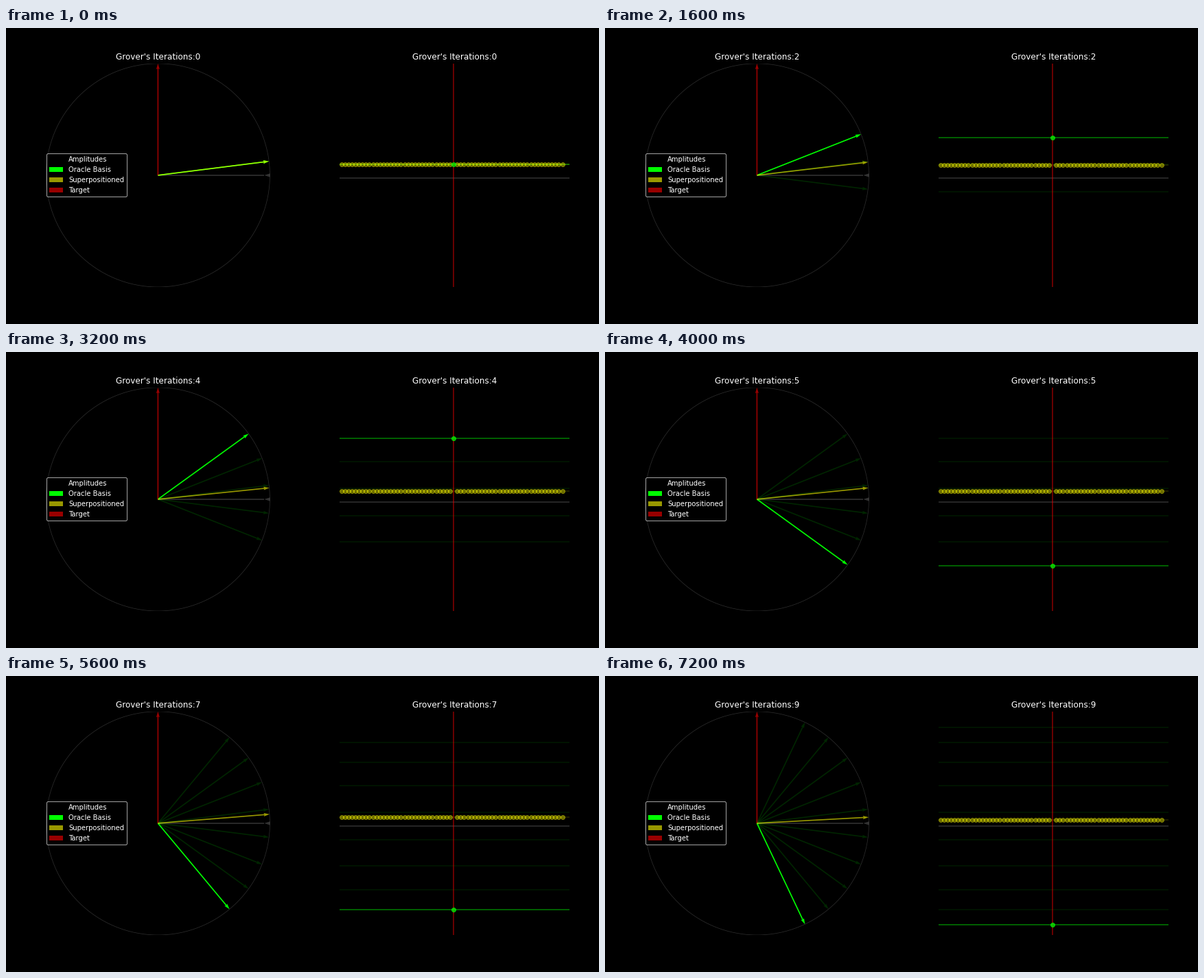
Recreate the animation shown at these times as a matplotlib script. Size 864x432 px, loop 8 s.

```python
import numpy as np
import matplotlib.pyplot as plt
from matplotlib.animation import FuncAnimation
from matplotlib.patches import Circle, Patch

W, H, DPI = 864, 432, 72
STATES, TARGET, STEPS = 64, 32, 10
THETA = np.arcsin(1 / np.sqrt(STATES))
LIME, YELLOW, RED = "#00ff00", "#ffff00", "#ff0000"

plt.rcParams["font.family"] = "DejaVu Sans"
fig = plt.figure(figsize=(W / DPI, H / DPI), dpi=DPI, facecolor="black")


def panel(left):
    ax = fig.add_axes([left, 0.125, 0.3875, 0.755])
    ax.axis("off")
    return ax, ax.set_title("", color="white", fontsize=12)


def arrow(color, alpha, zorder, x=1.0, y=0.0):
    return plane.quiver(0, 0, x, y, color=color, alpha=alpha, zorder=zorder,
                        angles="xy", scale_units="xy", scale=1,
                        units="width", width=0.005)


def level(color, alpha, zorder, y=0.0):
    return bars.axhline(y, color=color, alpha=alpha, zorder=zorder, lw=1.5)


def target_amp(k):
    """Signed amplitude of the marked state: odd steps show the oracle flip."""
    return (-1) ** k * np.sin((2 * (k // 2) + 1) * THETA)


def other_amp(k):
    return np.cos((2 * (k // 2) + 1) * THETA) / np.sqrt(STATES - 1)


def unit(y):
    return np.sqrt(1 - y * y), y


plane, plane_title = panel(0.0625)
half = 0.3875 * W / (0.755 * H)
plane.set(xlim=(-half, half), ylim=(-1, 1))
plane.add_patch(Circle((0, 0), 1, fill=False, ec="white", alpha=0.17, lw=0.8))
# Basis axis with its head turned inward
plane.plot([0, 0.95], [0, 0], color="white", alpha=0.2, lw=1.6,
           solid_capstyle="butt", zorder=2)
plane.fill([0.95, 1, 1], [0, 0.016, -0.016], color="white", alpha=0.2, lw=0)
arrow(RED, 0.6, 6, 0, 1)

handles = [Patch(color="black", lw=0, label="Amplitudes"),
           Patch(color=LIME, lw=0, label="Oracle Basis"),
           Patch(color=YELLOW, lw=0, alpha=0.6, label="Superpositioned"),
           Patch(color=RED, lw=0, alpha=0.6, label="Target")]
legend = plane.legend(handles=handles, loc="center left", fontsize=10,
                      bbox_to_anchor=(0, 0.501, 1, 0), facecolor="black",
                      edgecolor="0.8", labelcolor="white")
legend.set_zorder(10)

bars, bars_title = panel(0.5625)
bars.set(xlim=(-0.5, 65), ylim=(-1, 1.05))
level("white", 0.2, 1)
bars.axvline(TARGET, color=RED, alpha=0.55, lw=1.5, zorder=5)

# Faded trail of the earlier steps
trail = [(arrow(LIME, 0.15, 3, *unit(target_amp(k))),
          level(LIME, 0.1, 2, target_amp(k))) for k in range(STEPS - 1)]

main = arrow(LIME, 1, 4)
rest = arrow(YELLOW, 0.6, 5)
main_line = level(LIME, 0.5, 3)
rest_line = level(YELLOW, 0.15, 3)
others = np.delete(np.arange(STATES), TARGET)
rest_dots = bars.scatter(others, others * 0, s=36, color=YELLOW,
                         alpha=0.4, zorder=4)
main_dot = bars.scatter([TARGET], [0], s=36, color=LIME, alpha=0.7, zorder=6)


def update(k):
    a, b = target_amp(k), other_amp(k)
    for title in (plane_title, bars_title):
        title.set_text(f"Grover's Iterations:{k}")
    for i, ghosts in enumerate(trail):
        for ghost in ghosts:
            ghost.set_visible(i < k)
    for vec, line, y in ((main, main_line, a), (rest, rest_line, b)):
        vec.set_UVC(*unit(y))
        line.set_ydata([y, y])
    rest_dots.set_offsets(np.column_stack([others, np.full(len(others), b)]))
    main_dot.set_offsets([[TARGET, a]])
    return []


anim = FuncAnimation(fig, update, frames=STEPS, interval=800,
                     init_func=lambda: update(0), repeat=True, repeat_delay=0)
plt.show()
```
